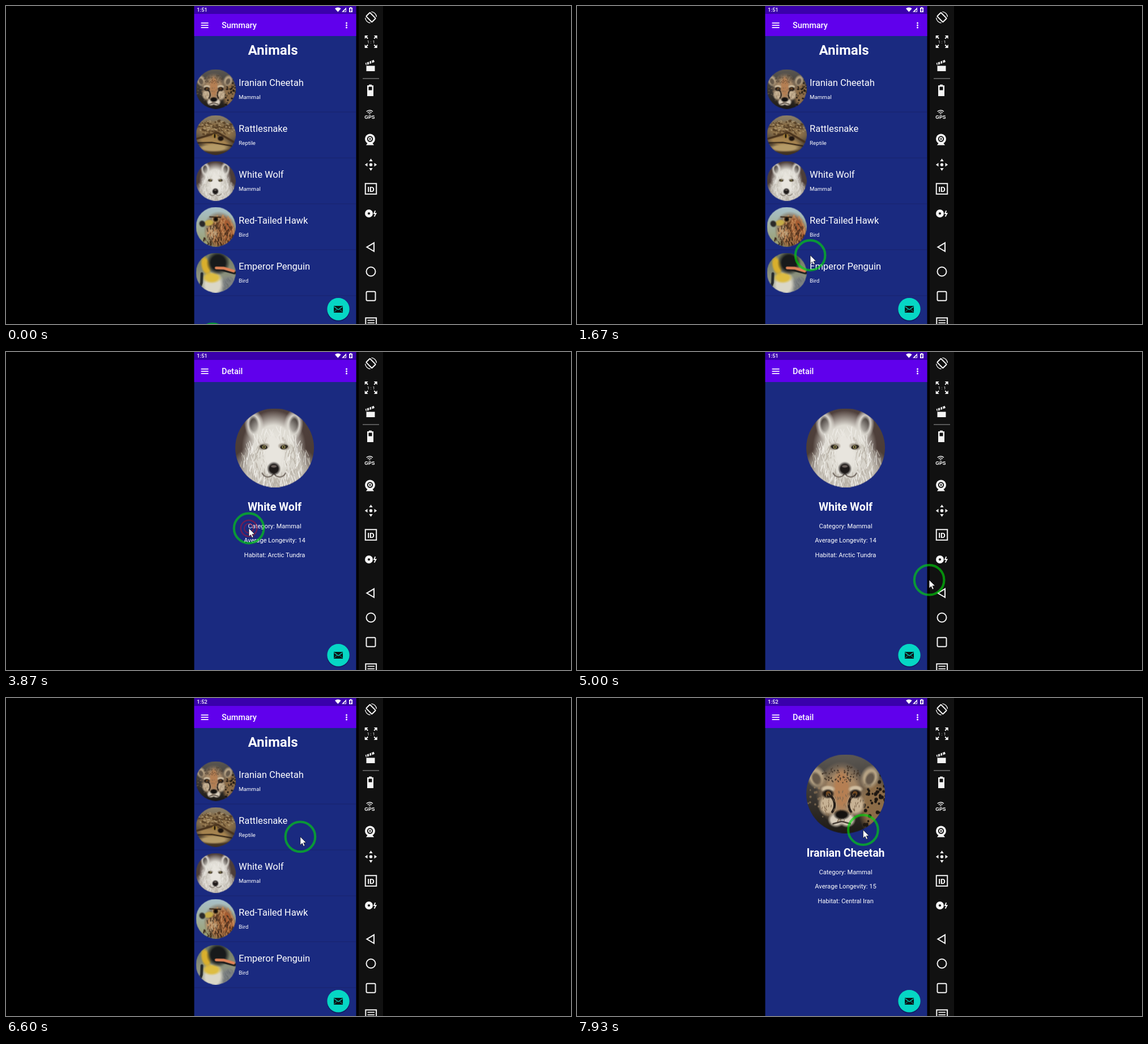
An HTML page with a canvas that plays this animation: 998 by 561 pixels, repeating every 8 s.

```html
<!DOCTYPE html>
<html lang="en">
<head>
<meta charset="utf-8">
<title>Animals</title>
<style>
html, body { margin: 0; width: 100%; height: 100%; overflow: hidden; background: #000; }
canvas { display: block; }
</style>
</head>
<body>
<canvas id="stage" width="998" height="561"></canvas>
<script>
const LOOP = 8000, TAU = Math.PI * 2;
const WHITE = '#f4f4f4', DARK = '#111';
const screen = document.getElementById('stage').getContext('2d');
let c = screen;

// ---------- helpers ----------
function rect(x, y, w, h, fill) { c.fillStyle = fill; c.fillRect(x, y, w, h); }
function box(x, y, w, h, round = 0) {
  c.beginPath(); c.roundRect(x - w / 2, y - h / 2, w, h, round);
  c.strokeStyle = WHITE; c.lineWidth = 2; c.stroke();
}
function trace(pts) {
  c.beginPath();
  for (let i = 0; i < pts.length; i += 2) c.lineTo(pts[i], pts[i + 1]);
}
function poly(fill, ...pts) { trace(pts); c.fillStyle = fill; c.fill(); }
function line(stroke, width, ...pts) {
  trace(pts);
  c.strokeStyle = stroke; c.lineWidth = width; c.stroke();
}
function oval(x, y, rx, ry, fill, turn = 0) {
  c.beginPath(); c.ellipse(x, y, rx, ry, turn, 0, TAU);
  c.fillStyle = fill; c.fill();
}
function disc(x, y, r, fill) { oval(x, y, r, r, fill); }
function ring(x, y, r, width, stroke, from = 0, to = TAU) {
  c.beginPath(); c.arc(x, y, r, from, to);
  c.lineWidth = width; c.strokeStyle = stroke; c.stroke();
}
function text(str, x, y, size, weight = 400, align = 'left', font = 'Roboto, sans-serif') {
  c.font = `${weight} ${size}px ${font}`;
  c.textAlign = align; c.fillStyle = '#fff';
  c.fillText(str, x, y);
}
function at(x, y, turn, draw) {
  c.save(); c.translate(x, y); c.rotate(turn); draw(); c.restore();
}

// ---------- portraits, drawn in a unit circle ----------
function backdrop(top, bottom) {
  const g = c.createLinearGradient(0, -1, 0, 1);
  g.addColorStop(0, top); g.addColorStop(1, bottom);
  rect(-1, -1, 2, 2, g);
}
// Soft-edged oval
function blob(x, y, rx, ry, hex, turn = 0) {
  at(x, y, turn, () => {
    c.scale(rx, ry);
    const g = c.createRadialGradient(0, 0, .6, 0, 0, 1);
    g.addColorStop(0, hex); g.addColorStop(1, hex + '00');
    disc(0, 0, 1, g);
  });
}
// Mirrors a drawing around the line x = mid
function pair(mid, draw) {
  for (const side of [1, -1]) at(mid, 0, 0, () => { c.scale(side, 1); draw(); });
}
// Seeded strokes inside an oval; zero length gives dots
function marks(seed, n, x, y, rx, ry, hex, width, length = 0, turn = Math.PI / 2) {
  const rnd = () => (seed = (seed * 16807) % 2147483647) / 2147483647;
  for (let i = 0; i < n; i++) {
    const a = rnd() * TAU, d = Math.sqrt(rnd()), dir = turn + rnd() - .5;
    const px = x + Math.cos(a) * d * rx, py = y + Math.sin(a) * d * ry;
    line(hex, width * (.6 + rnd() * .6), px, py, px + Math.cos(dir) * length, py + Math.sin(dir) * length + .001);
  }
}

function cheetah() {
  backdrop('#5c5853', '#1d1915');
  blob(.75, .3, .45, .8, '#8c6c47');
  marks(31, 70, .75, .25, .35, .85, '#1d1712', .08);
  marks(7, 25, -.75, .4, .3, .6, '#75624b', .06);
  pair(-.06, () => {
    blob(.68, -.42, .25, .32, '#b5a284', .4);
    blob(.68, -.38, .13, .2, '#65584a', .4);
  });
  blob(-.1, 0, .66, .82, '#a58766');
  blob(-.1, -.1, .24, .6, '#b57f53');
  pair(-.1, () => {
    blob(.36, .28, .25, .3, '#c7b294');
    blob(.35, -.12, .2, .1, '#cfbda0');
    blob(.35, 0, .17, .13, '#1e1713');
    disc(.34, -.01, .06, '#70471f');
    ring(.48, .28, .3, .06, '#251d18', 2.5, 4.2);
    blob(.14, .66, .22, .2, '#d8cdbc');
  });
  marks(12, 80, -.1, -.5, .5, .22, '#44362a', .035);
  marks(18, 60, -.1, .3, .55, .4, '#826a50', .02, .05);
  blob(-.1, .53, .22, .14, '#14110f');
  line('#342a24', .035, -.32, .76, -.1, .7, .12, .76);
}

function snake() {
  backdrop('#8d8068', '#40301f');
  blob(0, -.2, 1.2, .55, '#8d7149', .15);
  marks(71, 100, 0, -.35, 1, .4, '#594228', .07, .06, .3);
  marks(23, 60, 0, -.35, 1, .4, '#b69f76', .04, .06, .3);
  blob(-.1, .35, 1, .28, '#a5834f', .15);
  blob(-.1, .65, .9, .22, '#b59b68');
  line('#49331d', .1, -1, .2, .1, -.12, .9, .35);
  line('#2b1e12', .06, -1, .4, -.2, .38, .8, .55);
  blob(-.05, .05, .17, .13, '#a27e36');
  oval(-.05, .05, .04, .11, '#17100a');
  blob(.25, .18, .18, .15, '#20160f');
}

function wolf() {
  backdrop('#50413d', '#493a33');
  blob(0, .6, 1.15, .8, '#cac5bc');
  pair(-.02, () => {
    blob(.5, -.58, .25, .4, '#d5d1ca', .1);
    blob(.51, -.58, .14, .25, '#544d49', .1);
  });
  blob(-.02, 0, .82, .95, '#dfdcd4');
  marks(45, 190, 0, .35, .9, .65, '#b7b0a5', .016, .16);
  marks(22, 150, 0, .2, .8, .75, '#f0eee9', .018, .16);
  blob(-.02, .15, .32, .65, '#e8e5de');
  pair(-.02, () => {
    blob(.26, -.03, .17, .1, '#a39a8d', .2);
    oval(.26, -.02, .1, .055, '#2d2822', -.2);
    disc(.25, -.02, .042, '#aa9c58');
    disc(.25, -.02, .022, '#111');
    ring(.15, .58, .16, .03, '#756b63', .4, 2.8);
  });
  blob(-.02, .53, .18, .18, '#1d1918');
  blob(-.02, .47, .09, .04, '#6c625d');
}

function hawk() {
  backdrop('#a9c2cb', '#9a9d6d');
  blob(.25, .25, .85, 1.05, '#71492a', -.3);
  blob(.6, .2, .4, .85, '#a75d32', -.35);
  blob(-.2, .3, .35, .45, '#bea17a');
  marks(52, 120, .2, .45, .8, .75, '#3f2a1b', .04, .16);
  marks(19, 90, .3, .2, .65, .85, '#c78b58', .035, .16);
  blob(-.35, -.2, .3, .18, '#c6ad48', -.2);
  blob(-.68, -.15, .18, .2, '#2a2928', -.5);
  blob(0, -.38, .22, .19, '#d2bb8b');
  disc(0, -.38, .14, '#62401d');
  disc(0, -.38, .085, '#100d0b');
  line('#3a2617', .06, -.3, -.5, .24, -.48);
}

function penguin() {
  backdrop('#70795f', '#a1a494');
  blob(.65, .7, .55, .6, '#7c8081');
  marks(83, 50, .65, .7, .4, .5, '#63696b', .02, .12, 1);
  blob(-.15, .6, .6, .7, '#dad7c7');
  blob(-.2, .25, .5, .3, '#ddbd42');
  blob(-.5, -.35, .26, .55, '#d9af2d', -.25);
  blob(.12, -.5, .6, .62, '#171a1b');
  line('#25292b', .14, -.7, .05, -.72, .5, -.84, .85);
  line('#181b1c', .16, .1, -.22, .95, 0);
  line('#df8357', .14, .02, -.24, .4, -.23, .9, -.08);
}

function portrait(paint, r) {
  const art = document.createElement('canvas');
  art.width = art.height = r * 2;
  c = art.getContext('2d');
  c.scale(r, r); c.translate(1, 1);
  c.beginPath(); c.arc(0, 0, 1, 0, TAU); c.clip();
  c.lineCap = 'round';
  paint();
  c = screen;
  return (x, y) => c.drawImage(art, x - r, y - r);
}

const ROWS = [
  ['Iranian Cheetah', 'Mammal', cheetah],
  ['Rattlesnake', 'Reptile', snake],
  ['White Wolf', 'Mammal', wolf],
  ['Red-Tailed Hawk', 'Bird', hawk],
  ['Emperor Penguin', 'Bird', penguin]
].map(([name, kind, paint]) => ({ name, kind, draw: portrait(paint, 35) }));
const WOLF = { name: 'White Wolf', age: 14, home: 'Arctic Tundra', draw: portrait(wolf, 69.5) };
const CHEETAH = { name: 'Iranian Cheetah', age: 15, home: 'Central Iran', draw: portrait(cheetah, 69.5) };

// ---------- phone ----------
function header(title, clock) {
  rect(332.5, 0, 286, 561, '#1a2a80');
  rect(332.5, 0, 286, 14, '#3a00ac');
  rect(332.5, 14, 286, 39, '#6000ec');
  text(clock, 337, 10, 9.5, 500);
  text(title, 381, 39, 14.4, 500);
  for (let y = 30; y < 40; y += 4) {
    rect(344.5, y - .8, 13, 1.7, '#fff');
    disc(601.5, y, 1.5, '#fff');
  }
  c.beginPath(); c.moveTo(586.3, 10.5); c.arc(586.3, 10.5, 8, -2.3, -.84);
  c.fillStyle = '#fff'; c.fill();
  poly('#fff', 593, 10.5, 601, 10.5, 601, 2.5);
  poly('#3a00ac', 596.5, 9.5, 600, 9.5, 600, 6);
  rect(606, 3, 6, 8, '#fff');
  rect(607.7, 2, 2.6, 1, '#fff');
  line('#3a00ac', 1.3, 609.6, 4, 608.2, 7, 609.8, 7, 608.4, 10);
}

function list() {
  text('Animals', 471.5, 86, 24.1, 700, 'center');
  ROWS.forEach((row, i) => {
    const y = i * 81;
    row.draw(370.5, 146.5 + y);
    text(row.name, 411, 141 + y, 16.5);
    text(row.kind, 411, 163.7 + y, 9.75);
    rect(333, 186.5 + y, 285, 1, '#18226c');
  });
}

function detail(animal) {
  animal.draw(474.5, 169);
  text(animal.name, 474.5, 280, 19.5, 700, 'center');
  ['Category: Mammal', 'Average Longevity: ' + animal.age, 'Habitat: ' + animal.home]
    .forEach((str, i) => text(str, 474.5, 311 + i * 25.4, 11.15, 400, 'center'));
}

function mailButton() {
  disc(587, 536.5, 20, 'rgba(10,15,60,.45)');
  disc(587, 534.7, 19.7, '#06d6c4');
  rect(579, 529, 16, 12, '#0a1718');
  pair(587, () => {
    line('#06d6c4', 1.2, 0, 535.8, 7.5, 530.2);
    line('#06d6c4', .8, 2.5, 535, 7.5, 540);
  });
}

// ---------- emulator side bar ----------
function sideBar(hover) {
  rect(623, 0, 43, 561, DARK);

  at(644.5, 20, -.78, () => {
    box(0, 0, 9.5, 14.5, 1);
    ring(0, 0, 10, 1.3, WHITE, -.7, .7);
    ring(0, 0, 10, 1.3, WHITE, 2.44, 3.84);
  });

  for (let i = 0; i < 4; i++) {
    at(644.7, 63, i * TAU / 4, () => {
      poly(WHITE, 11, 11, 5, 11, 11, 5);
      line(WHITE, 1.8, 10, 10, 5.5, 5.5);
    });
    at(644.5, 280, i * TAU / 4, () => poly(WHITE, 10.7, 0, 6, -3.2, 6, 3.2));
  }
  text('1 : 1', 644.7, 65.7, 7.5, 400, 'center');
  disc(644.5, 280, 2.7, WHITE);

  rect(636.5, 105.5, 15, 9.5, WHITE);
  at(636, 104.5, -.36, () => {
    rect(0, -4, 16, 4, WHITE);
    for (let x = 3; x < 15; x += 4.5) line(DARK, 1.5, x, -4, x - 1.5, 0);
  });
  rect(630, 127.5, 29, 1, '#a0a0a0');

  rect(638, 140, 11, 19, WHITE);
  rect(641, 138.6, 5, 2, WHITE);
  rect(640.5, 142.5, 6, 6, DARK);

  for (let r = 2; r < 9; r += 3) ring(642.3, 192, r, 1.4, WHITE, -2.35, -.8);
  text('GPS', 642.3, 199.3, 8.6, 700, 'center', '"Liberation Sans", sans-serif');

  poly(WHITE, 640, 240, 646, 240, 650, 245.5, 636, 245.5);
  [[9, WHITE], [5.2, DARK], [3.3, WHITE], [1.5, DARK]].forEach(([r, fill]) => disc(643, 234.5, r, fill));

  box(644.5, 322.5, 19.5, 18.5);
  text('ID', 644.5, 327.6, 13.5, 700, 'center');

  disc(641, 366, 7, WHITE);
  disc(641, 366, 2.1, DARK);
  line(WHITE, 1.8, 652.3, 361, 650, 366, 653.5, 366, 650.5, 371.5);

  if (hover) rect(623, 404, 43, 43, '#242424');
  trace([637.3, 425.3, 650, 417.8, 650, 432.8]);
  c.closePath();
  c.strokeStyle = hover ? '#d0184c' : WHITE; c.lineWidth = 2; c.stroke();
  ring(644.5, 468.5, 8, 2, WHITE);
  box(644.5, 511.7, 16, 16, 2);
  box(644.7, 558.3, 18.8, 16);
  rect(638.5, 553.7, 12.5, 1.7, WHITE);
  rect(638.5, 558, 12.5, 1.7, WHITE);
}

// ---------- pointer ----------
const KEYS = [
  [0, 365, 587], [1000, 370, 598], [1670, 412, 440], [2200, 429, 311], [4500, 429, 311],
  [5000, 622, 402], [5250, 640, 430], [6000, 640, 412], [7000, 455, 161], [7350, 455, 161],
  [LOOP, 507, 235]
];
const OPEN_WOLF = 3700, BACK = 5700, OPEN_CHEETAH = 7130;

// Smooth path through the keys that never overshoots
function slope(i, k) {
  const a = KEYS[i], b = KEYS[i + 1];
  return a && b ? (b[k] - a[k]) / (b[0] - a[0]) : 0;
}
function tangent(i, k) {
  const a = slope(i - 1, k), b = slope(i, k);
  return a * b > 0 ? 2 * a * b / (a + b) : 0;
}
function pointerAt(t) {
  const i = KEYS.findIndex(key => key[0] > t) - 1, a = KEYS[i], b = KEYS[i + 1];
  const d = b[0] - a[0], s = (t - a[0]) / d, q = 1 - s;
  return [1, 2].map(k =>
    q * q * ((1 + 2 * s) * a[k] + s * d * tangent(i, k)) +
    s * s * ((1 + 2 * q) * b[k] - q * d * tangent(i + 1, k)));
}

function pointer(t, x, y) {
  for (const change of [OPEN_WOLF, BACK, OPEN_CHEETAH]) {
    const p = (t - change + 60) / 450;
    if (p < 0 || p > 1) continue;
    c.globalAlpha = .7 * (1 - p * .8);
    ring(x, y, 4 + p * 20, 2.5, '#e10f19');
    ring(x, y, 1 + p * 14, 2, '#e10f19');
    c.globalAlpha = 1;
  }
  ring(x, y, 26.3, 4.2, 'rgba(0,218,10,.62)');
  at(x, y, 0, () => {
    trace([0, 0, 0, 14.5, 3.4, 11.4, 5.7, 16.6, 8, 15.6, 5.8, 10.5, 10.2, 10.2]);
    c.closePath();
    c.fillStyle = '#fff'; c.fill();
    c.strokeStyle = 'rgba(0,0,0,.75)'; c.lineWidth = .8; c.stroke();
  });
}

function frame(t) {
  const [x, y] = pointerAt(t);
  const animal = t >= OPEN_CHEETAH ? CHEETAH : t >= OPEN_WOLF && t < BACK ? WOLF : null;
  rect(0, 0, 998, 561, '#000');
  header(animal ? 'Detail' : 'Summary', t < BACK ? '1:51' : '1:52');
  if (animal) detail(animal); else list();
  mailButton();
  sideBar(x >= 623 && x < 666 && y >= 404 && y < 447);
  pointer(t, x, y);
}

const start = performance.now();
function tick() {
  frame((performance.now() - start) % LOOP);
  requestAnimationFrame(tick);
}
tick();
</script>
</body>
</html>
```
